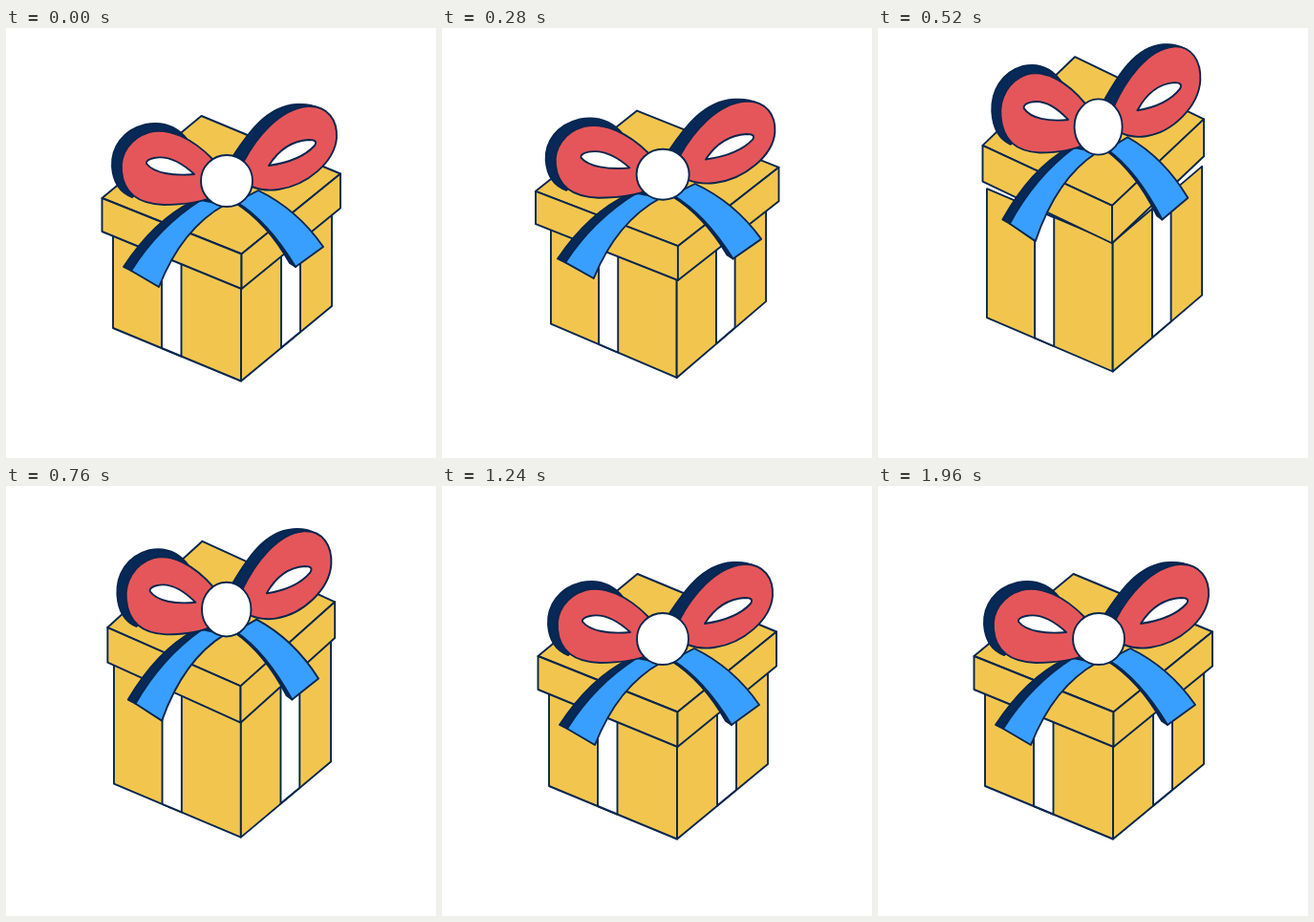
An HTML page that plays this animation: 450x450 px, repeating every 2000 ms.

```html
<!DOCTYPE html>
<html lang="en">
<head>
<meta charset="utf-8">
<title>Gift box</title>
<style>
  html, body { margin: 0; height: 100%; overflow: hidden; background: #fff; }
  svg { display: block; width: 100vw; height: 100vh; }
  path, circle {
    stroke: #07264f; stroke-width: 1.9; stroke-linejoin: round;
    vector-effect: non-scaling-stroke;
  }
  .gold { fill: #f2c64e; }
  .red { fill: #e5565a; }
  .blue { fill: #389ffe; }
  .navy { fill: #062957; }
  .white { fill: #fff; }
</style>
</head>
<body>
<svg viewBox="0 0 450 450">
  <g id="box">
    <path class="gold" d="M112 181.5L246 236.5V369.5L112 314Z"/>
    <path class="gold" d="M246 236.5L341 158.5V291L246 369.5Z"/>
    <path class="white" d="M163 202.5L183.5 211V343.5L163 335Z"/>
    <path class="white" d="M288 202L308 185.5V318L288 334.5Z"/>
  </g>
  <g id="lid">
    <path class="gold" d="M100.5 178L204.5 92L350 152.5L246.5 236.5Z"/>
    <path class="gold" d="M100.5 178L246.5 236.5V273L100.5 213Z"/>
    <path class="gold" d="M246.5 236.5L350 152.5V188.5L246.5 273Z"/>
    <!-- ribbon tails -->
    <path class="navy" d="M123 250Q155 201 196 181L213 180Q165 208 131 254Z"/>
    <path class="blue" d="M131 254Q160 208 204 180L229 185Q184 210 160 271Z"/>
    <path class="navy" d="M240 183Q273 204 297 246L303 250Q277 200 243 180Z"/>
    <path class="blue" d="M241 182Q274 202 303 250L332 229Q305 190 264 170Z"/>
    <!-- left loop -->
    <path class="navy" d="M190 117C178 102 162 98 146 101C122 107 110 125 111 145C112 160 119 172 132 177L150 160Z"/>
    <path class="red" d="M217 138C195 115 170 104 150 109C130 115 119 132 121 150C123 171 137 184 165 185C185 185 205 182 218 176Z"/>
    <path class="white" d="M197 153C185 142 170 133 155 136Q146 138 147 142C155 152 175 155 197 153Z"/>
    <!-- right loop -->
    <path class="navy" d="M237 135C252 112 272 82 304 80Q318 79 328 84L300 110L248 141Z"/>
    <path class="red" d="M248 141C262 114 287 84 316 82C337 81 347 97 346 115C344 140 315 165 285 169C270 171 262 168 257 166Z"/>
    <path class="white" d="M275 144C285 128 299 118 317 117Q327 117 323 123C313 134 296 141 275 144Z"/>
    <circle class="white" cx="231" cy="160" r="27"/>
  </g>
</svg>
<script>
const LOOP = 2000, STEP = 40;

// Eased progress from 0 at time a to 1 at time b.
function ease(t, a, b) {
  const p = Math.min(Math.max((t - a) / (b - a), 0), 1);
  return (1 - Math.cos(Math.PI * p)) / 2;
}

// Stretch about (x, y), keeping the area, then lift.
function pose(id, x, y, lift, width) {
  document.getElementById(id).setAttribute("transform",
    `translate(${x} ${y - lift}) scale(${width} ${1 / width}) translate(${-x} ${-y})`);
}

function draw() {
  const now = Math.floor(performance.now() % LOOP / STEP) * STEP;
  const e = (a, b) => ease(now, a, b);

  // The lid crouches, leaps tall and thin, lands flat and settles.
  const lidLift = 49 * (e(170, 560) - e(530, 1000));
  const lidWidth = 1 + .06 * e(0, 150) - .132 * e(150, 500)
    + .134 * e(640, 1060) - .062 * e(1060, 1160);
  pose("lid", 225.5, 273, lidLift, lidWidth);

  // The box is pulled up a little behind it.
  const boxLift = 10 * (e(130, 500) - e(560, 840));
  const boxWidth = 1 - .017 * (e(130, 280) - e(600, 920));
  pose("box", 226.5, 369.5, boxLift, boxWidth);

  requestAnimationFrame(draw);
}
draw();
</script>
</body>
</html>
```
